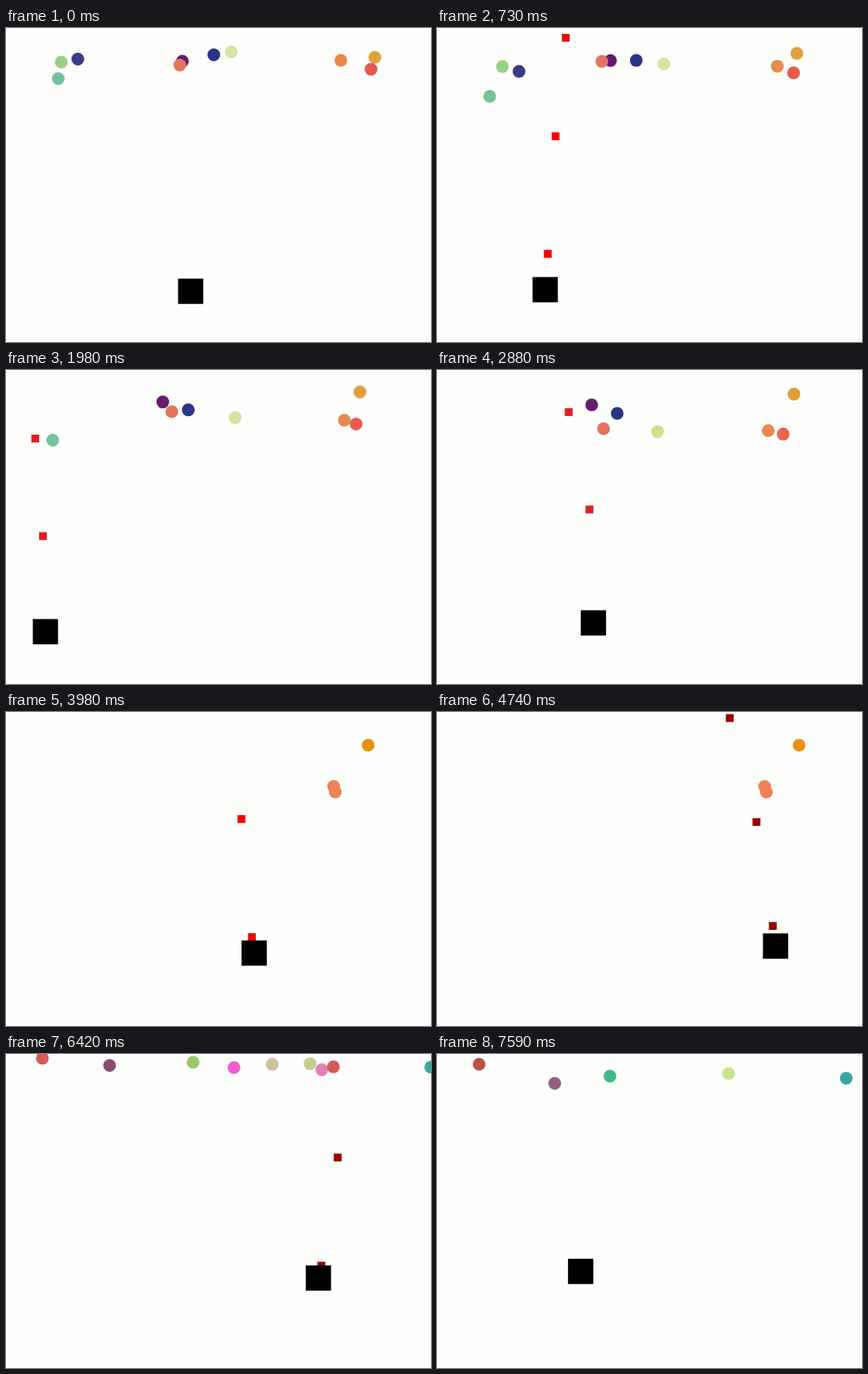
An HTML page with a canvas for the animation above (7.77 s loop, 500x369 px).

```html
<!DOCTYPE html>
<html>
<head>
<meta charset="utf-8">
<title>Shooter</title>
<style>
html, body { margin: 0; width: 100%; height: 100%; overflow: hidden; background: #fefefc; }
canvas { display: block; }
</style>
</head>
<body>
<canvas id="stage" width="500" height="369"></canvas>
<script>
const ctx = document.getElementById('stage').getContext('2d');
const LOOP = 7770, WAVE2 = 5460;
const SPEED = 0.66, RADIUS = 7.5, SHOT = 9.2, SHIP = 29.7;

// Smooth curve through [time, value] points
function curve(pts) {
  const last = pts.length - 1;
  const slope = i => {
    const a = pts[Math.max(i - 1, 0)], b = pts[Math.min(i + 1, last)];
    return (b[1] - a[1]) / (b[0] - a[0]);
  };
  return t => {
    if (t <= pts[0][0]) return pts[0][1];
    if (t >= pts[last][0]) return pts[last][1];
    let i = 0;
    while (t >= pts[i + 1][0]) i++;
    const [t0, a] = pts[i], [t1, b] = pts[i + 1], d = t1 - t0, u = (t - t0) / d;
    const ease = u * u * (3 - 2 * u);
    return a + (b - a) * ease + d * u * (1 - u) * (slope(i) * (1 - u) - slope(i + 1) * u);
  };
}

// The picture advances in steps: each span is [end, number of steps]
const steps = [0];
for (const [end, n] of [[30, 1], [900, 5], [3060, 12], [3980, 5], [4200, 1], [5460, 7], [7590, 11]]) {
  const from = steps[steps.length - 1];
  for (let i = 1; i <= n; i++) steps.push(Math.round((from + (end - from) * i / n) / 10) * 10);
}

const shipX = curve([[0, 217.3], [280, 151.5], [456, 139.5], [730, 127.3], [900, 117], [1247, 74],
  [1480, 33], [1809, 43.5], [1980, 46.4], [2497, 155], [2674, 179.3], [2880, 184], [3338, 216],
  [3560, 262], [3737, 277], [3965, 290.5], [4200, 321], [4500, 374], [5080, 427], [5240, 442],
  [5460, 442.3], [5624, 434], [5819, 407], [6208, 371], [6402, 330], [6986, 266], [7590, 169]]);
const shipY = curve([[0, 309.4], [730, 307.5], [1980, 307.5], [2880, 297.2], [3980, 283.3],
  [5460, 268.5], [7590, 255.5]]);

// A ball drifts through points spread evenly over its span; colours are [first, last]
function ball(colors, born, span, ...pts) {
  const path = k => curve(pts.map((p, i) => [born + span * i / (pts.length - 1), p[k]]));
  return { colors, born, span, x: path(0), y: path(1), end: born < WAVE2 ? WAVE2 - 20 : LOOP };
}
const first = (colors, span, ...pts) => ball(colors, 0, span, ...pts);
const second = (colors, ...pts) => ball(colors, WAVE2, 2130, ...pts);

const balls = [
  first(['#98d086'], 1500, [65, 40], [77, 45.5], [71, 50]),
  first(['#74c19a'], 1980, [61.5, 59.5], [61.5, 85], [55, 82.5]),
  first(['#393c86'], 1460, [84.5, 36.5], [96.5, 51], [98, 57]),
  first(['#641c6e'], 2880, [207.5, 39], [202, 38], [185, 37.5], [182, 41]),
  first(['#e1765c'], 2880, [204.5, 43.5], [192, 39], [195, 48], [196, 69]),
  first(['#2a3488'], 2880, [244.5, 31.5], [231, 40], [215, 46.5], [212, 51]),
  first(['#d2e4a8', '#dbda8c'], 2880, [265, 28], [267.5, 46], [270, 55], [259.5, 72.5]),
  first(['#e78a4e', '#ec8256'], 3980, [394, 38], [403, 51], [391, 68], [385.5, 87.5]),
  first(['#e0a03e', '#e89010'], 3980, [434, 34.5], [417, 27], [419, 27], [426, 39]),
  first(['#e7584f', '#ec8256'], 3980, [429.5, 48.5], [413, 57], [410, 72], [387.5, 94]),

  second(['#d65a58', '#ba524c'], [39, 1], [49.5, 12]),
  second(['#8a4c76', '#945e84'], [112.5, 1.5], [138.5, 34.5]),
  second(['#e080b8'], [377, 7.5], [362, 38]),
  second(['#d85a58'], [383.5, 1], [388, 40]),
  second(['#653c7c'], [407, 0.5], [407, 40]),
  second(['#9ec864', '#3ebc8a'], [229.5, 0.5], [203.5, 26]),
  second(['#f05cd0'], [269.5, 7.5], [266, 31]),
  second(['#d2bfa2'], [315, 2], [310, 30]),
  second(['#c3ce8e', '#cae28e'], [366, 5], [343, 23]),
  second(['#37a99f'], [510, 8], [481.5, 28.5])
];

// About five shots per second, spread evenly between the marks
const shots = [];
const marks = [280, 456, 666, 1635, 1809, 2497, 2674, 3560, 3737, 3951, 5080, 5252, 5430, 7180];
marks.forEach((a, i) => {
  const b = marks[i + 1] || a + 200, n = Math.max(1, Math.round((b - a) / 200));
  for (let k = 0; k < n; k++) {
    const born = a + (b - a) * k / n;
    shots.push({ born, x: shipX(born), y0: shipY(born), end: LOOP });
  }
});
const shotY = (s, t) => s.y0 - SPEED * (t - s.born);
const alive = (o, t) => t >= o.born && t < o.end;

// Play the loop once to find which shot meets which ball
const reach = RADIUS + SHOT / 2;
for (let t = 0; t < LOOP; t += 4) {
  for (const s of shots) {
    const y = shotY(s, t);
    if (!alive(s, t) || y < 0) continue;
    const hit = balls.find(b => alive(b, t) &&
      Math.abs(b.x(t) - s.x) < reach && Math.abs(b.y(t) - y) < reach);
    if (hit) hit.end = s.end = t;
  }
}

function mix(from, to, u) {
  const part = (hex, i) => parseInt(hex.slice(i, i + 2), 16);
  return `rgb(${[1, 3, 5].map(i => Math.round(part(from, i) * (1 - u) + part(to, i) * u))})`;
}

function square(x, y, size, color) {
  ctx.fillStyle = color;
  ctx.fillRect(x - size / 2, y - size / 2, size, size);
}

function shotColor(t) {
  if (t < 1080) return '#fb0007';
  if (t < 3240) return '#e51c24';
  return t < 4380 ? '#f00000' : '#980004';
}

function draw(t) {
  ctx.fillStyle = '#fefefc';
  ctx.fillRect(0, 0, 500, 369);
  for (const b of balls) {
    if (!alive(b, t)) continue;
    const [from, to = from] = b.colors, u = Math.min((t - b.born) / b.span, 1);
    ctx.fillStyle = mix(from, to, u ** 4);
    ctx.beginPath();
    ctx.arc(b.x(t), b.y(t), RADIUS, 0, Math.PI * 2);
    ctx.fill();
  }
  for (const s of shots) {
    if (alive(s, t)) square(s.x, shotY(s, t), SHOT, shotColor(t));
  }
  square(shipX(t), shipY(t), SHIP, '#000');
}

const start = performance.now();
function tick() {
  const t = (performance.now() - start) % LOOP;
  let i = steps.length - 1;
  while (steps[i] > t) i--;
  draw(steps[i]);
  requestAnimationFrame(tick);
}
tick();
</script>
</body>
</html>
```
